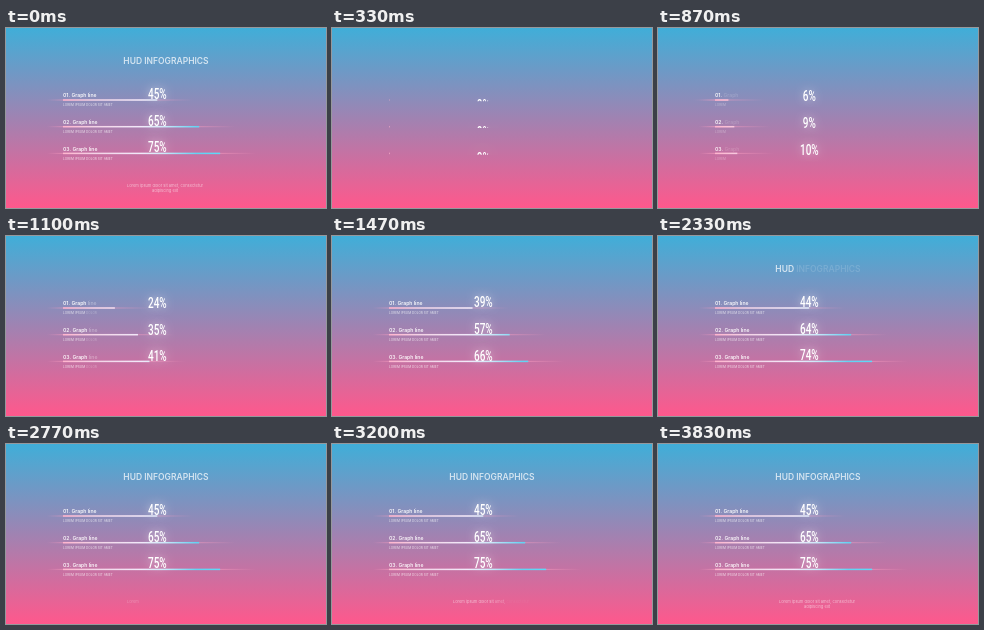
An HTML page with a canvas for the animation above (5.01 s loop, 320 px wide and 180 px high).

```html
<!DOCTYPE html>
<html lang="en">
<head>
<meta charset="utf-8">
<title>HUD Infographics</title>
<style>
html, body { margin: 0; width: 100%; height: 100%; overflow: hidden; }
canvas { display: block; width: 320px; height: 180px; }
</style>
</head>
<body>
<canvas id="stage"></canvas>
<script>
const LOOP = 5010, LEFT = 57, FULL = 209.5, SLIDE = 12;
const canvas = document.getElementById('stage');
const ctx = canvas.getContext('2d');
const ratio = window.devicePixelRatio || 1;
canvas.width = 320 * ratio;
canvas.height = 180 * ratio;

const rows = [45, 65, 75].map((percent, i) => ({
  percent, y: 72 + i * 26.7, label: `0${i + 1}. Graph line`
}));

const clamp = v => Math.min(1, Math.max(0, v));
const ramp = (t, start, length) => clamp((t - start) / length);
const white = a => `rgba(255,255,255,${a})`;
const sans = (weight, size) => `${weight} ${size}px Inter, "Open Sans", sans-serif`;

function gradient(x0, y0, x1, y1, stops) {
  const g = ctx.createLinearGradient(x0, y0, x1, y1);
  stops.forEach(([at, color]) => g.addColorStop(at, color));
  return g;
}

const sky = gradient(0, 0, 0, 180, [[0, '#40aed8'], [1, '#ff588c']]);
const barFill = gradient(LEFT, 0, 214, 0, [
  [0, '#ffb4cd'], [0.2, '#f3d3e6'], [0.5, '#f1eafa'],
  [0.66, '#c3e6f8'], [0.85, '#62d3f3'], [1, '#5cd9f8']
]);

// Slow start, fast middle, long settle: cubic-bezier(.716, 0, .044, 1)
function grow(t) {
  const x = ramp(t, 170, 2223);
  if (x === 0 || x === 1) return x;
  let lo = 0, hi = 1;
  for (let i = 0; i < 24; i++) {
    const s = (lo + hi) / 2, r = 1 - s;
    if (3 * s * r * r * 0.716 + 3 * s * s * r * 0.044 + s * s * s < x) lo = s;
    else hi = s;
  }
  return lo * lo * (3 - 2 * lo);
}

// Fades a line in word by word
function words(text, x, y, t, start, step, length, alpha) {
  let head = '';
  text.split(' ').forEach((word, i) => {
    ctx.fillStyle = white(alpha * ramp(t, start + i * step, length));
    ctx.fillText(word, x + ctx.measureText(head).width, y);
    head += word + ' ';
  });
}

function centered(text, x, ...rest) {
  words(text, x - ctx.measureText(text).width / 2, ...rest);
}

function flare(x, y, reach, alpha) {
  ctx.fillStyle = gradient(x - reach, 0, x + reach, 0, [
    [0, 'rgba(255,160,195,0)'], [0.5, `rgba(255,160,195,${alpha})`], [1, 'rgba(255,160,195,0)']
  ]);
  ctx.fillRect(x - reach, y - 0.5, 2 * reach, 1);
}

function counter(value, y, t) {
  if (t < 290) return;
  const drop = SLIDE * (1 - ramp(t, 290, 1700)) ** 4;
  ctx.save();
  ctx.beginPath();
  ctx.rect(120, y - 30, 64, 30.5 + 9 * (1 - drop / SLIDE));
  ctx.clip();
  ctx.translate(151.3, y - 1 + drop);
  ctx.scale(0.69, 1); // condensed face
  ctx.font = '500 14.5px Roboto, "Liberation Sans", sans-serif';
  ctx.textAlign = 'center';
  ctx.fillStyle = '#fff';
  ctx.shadowColor = white(0.6 * (1 - drop / SLIDE));
  ctx.shadowBlur = 9 * ratio;
  ctx.fillText(value + '%', 0, 0);
  ctx.restore();
}

function drawRow({ percent, y, label }, t) {
  const amount = grow(t);
  const length = FULL * percent / 100 * amount;
  const glow = ramp(t, 350, 500);
  flare(LEFT, y, 16, 0.5 * glow);
  flare(LEFT + length, y, 36, 0.5 * glow);
  ctx.fillStyle = barFill;
  ctx.fillRect(LEFT, y - 0.75, length, 1.5);

  ctx.font = sans(600, 5.1);
  words(label, LEFT, y - 2.8, t, 640, 190, 220, 0.92);
  ctx.font = sans(400, 3.2);
  words('LOREM IPSUM DOLOR SIT AMET', LEFT, y + 6.2, t, 790, 120, 160, 0.75);
  counter(Math.floor(percent * amount), y, t);
}

function draw() {
  const now = performance.now() % LOOP;
  const t = now < 30 ? LOOP : now; // the finished picture flashes first
  ctx.setTransform(ratio, 0, 0, ratio, 0, 0);
  ctx.fillStyle = sky;
  ctx.fillRect(0, 0, 320, 180);
  if (t >= 170) {
    rows.forEach(row => drawRow(row, t));
    ctx.font = sans(600, 8.5);
    centered('HUD INFOGRAPHICS', 160, 35.6, t, 1800, 430, 500, 0.72);
    ctx.font = sans(400, 4);
    centered('Lorem ipsum dolor sit amet, consectetur', 159, 159.2, t, 2680, 100, 180, 0.58);
    centered('adipiscing elit', 159, 164.4, t, 3280, 100, 180, 0.58);
  }
  requestAnimationFrame(draw);
}
draw();
</script>
</body>
</html>
```
